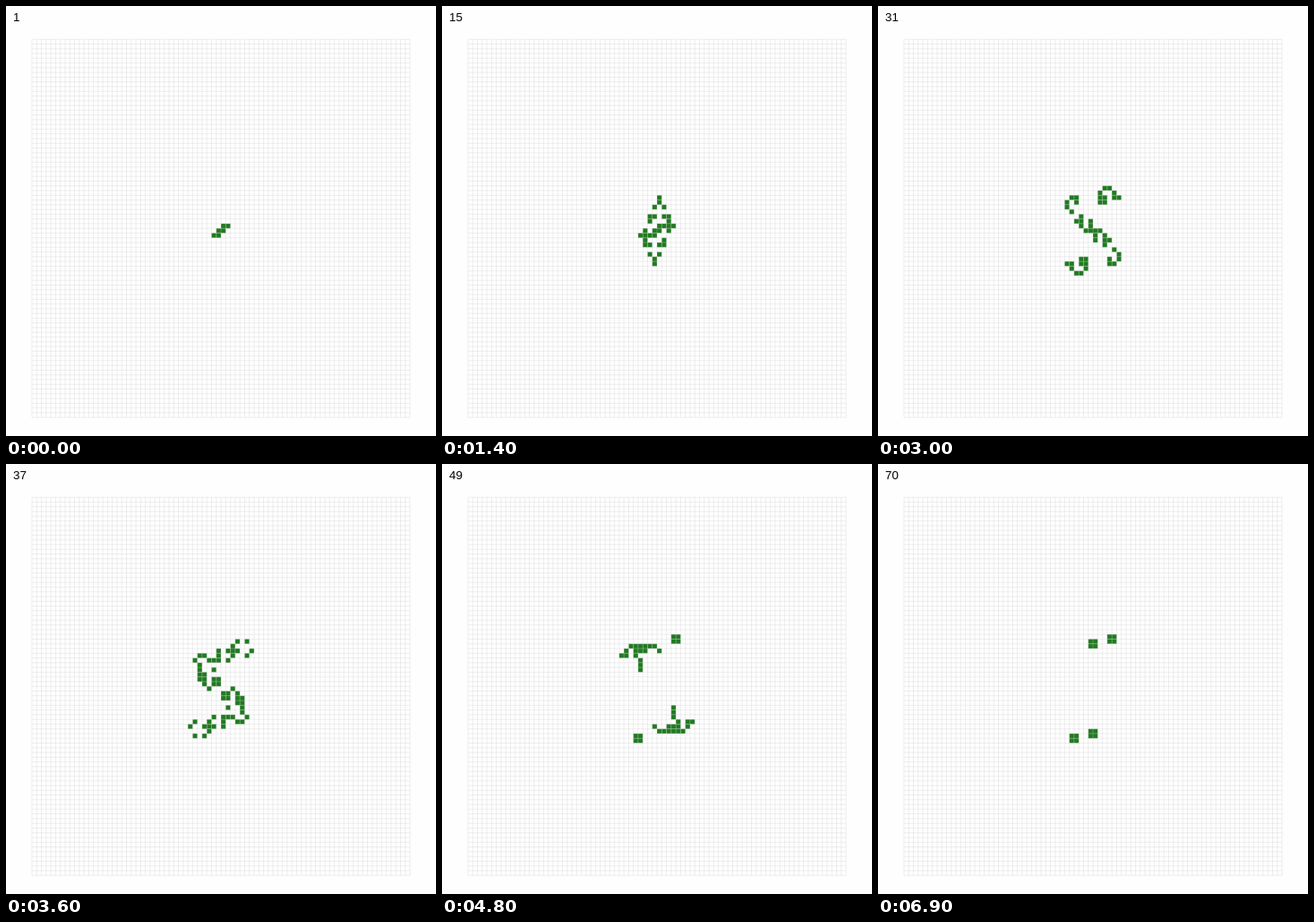
An HTML page with a canvas that plays this animation: 480 by 480 pixels, repeating every 7000 ms.

```html
<!DOCTYPE html>
<html lang="en">
<head>
<meta charset="utf-8">
<title>Game of Life</title>
<style>
  html, body { margin: 0; width: 100%; height: 100%; overflow: hidden; background: #fefefe; }
  canvas { position: absolute; left: 0; top: 0; }
  #count {
    position: absolute; left: 8px; top: 5px;
    font: 13.33px/15px "Liberation Sans", Arial, sans-serif; color: #000;
  }
</style>
</head>
<body>
<canvas id="board" width="480" height="480"></canvas>
<div id="count">1</div>
<script>
const SIZE = 80, CELL = 5.275, LEFT = 29, TOP = 37.2;
const STEPS = 70, STEP_MS = 100;
const START = [[40, 39], [41, 39], [39, 40], [40, 40], [38, 41], [39, 41]];

const ctx = document.getElementById('board').getContext('2d');
const count = document.getElementById('count');
const px = col => LEFT + col * CELL;
const py = row => TOP + row * CELL;
const key = (x, y) => y * SIZE + x;

// One step of Conway's rule, B3/S23
function evolve(live) {
  const near = new Map();
  for (const k of live) {
    const x = k % SIZE, y = Math.floor(k / SIZE);
    for (let dy = -1; dy <= 1; dy++) {
      for (let dx = -1; dx <= 1; dx++) {
        if (!dx && !dy) continue;
        const n = key(x + dx, y + dy);
        near.set(n, (near.get(n) || 0) + 1);
      }
    }
  }
  const next = new Set();
  for (const [k, n] of near) {
    if (n === 3 || (n === 2 && live.has(k))) next.add(k);
  }
  return next;
}

const history = [new Set(START.map(([x, y]) => key(x, y)))];
while (history.length < STEPS) history.push(evolve(history[history.length - 1]));

const mesh = new Path2D();
for (let i = 0; i <= SIZE; i++) {
  mesh.moveTo(px(i), py(0));
  mesh.lineTo(px(i), py(SIZE));
  mesh.moveTo(px(0), py(i));
  mesh.lineTo(px(SIZE), py(i));
}

function draw(step) {
  ctx.fillStyle = '#fefefe';
  ctx.fillRect(0, 0, 480, 480);
  ctx.fillStyle = '#207a20';
  for (const k of history[step]) {
    ctx.fillRect(px(k % SIZE), py(Math.floor(k / SIZE)), CELL, CELL);
  }
  ctx.strokeStyle = 'rgba(200, 200, 200, 0.4)';
  ctx.lineWidth = 0.8;
  ctx.stroke(mesh);
  count.textContent = step + 1;
}

let shown = -1;
function tick() {
  const step = Math.floor(performance.now() / STEP_MS) % STEPS;
  if (step !== shown) draw(shown = step);
  requestAnimationFrame(tick);
}
tick();
</script>
</body>
</html>
```
